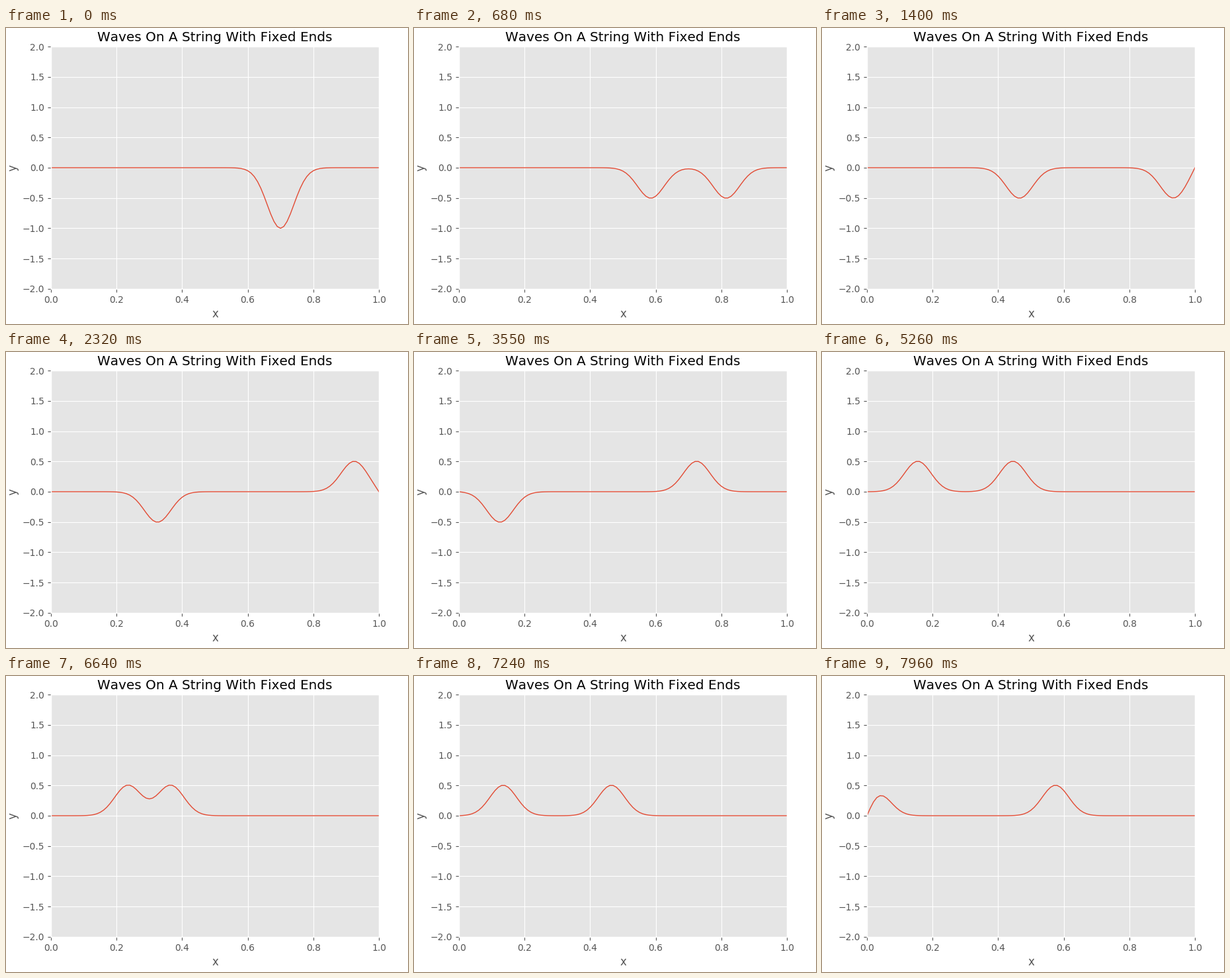
Write a matplotlib script that moves like this. It is 608 px wide and 447 px high and loops after 8000 ms.

```python
import numpy as np
import matplotlib.pyplot as plt
from matplotlib.animation import FuncAnimation

W, H, DPI = 608, 447, 100
TICK, LOOP = 20, 8000
POINTS, STEPS = 101, 132


def simulate(x):
    """Wave equation on a plucked string, fixed ends, Courant number 1."""
    y = np.zeros((STEPS, x.size))
    y[0, 1:-1] = -np.exp(-300 * (x[1:-1] - 0.7) ** 2)
    y[1] = y[0]
    for n in range(1, STEPS - 1):
        y[n + 1, 1:-1] = y[n, 2:] + y[n, :-2] - y[n - 1, 1:-1]
    return y


def step_at(ms):
    """Simulation step at a time; the pace slackens slightly late on."""
    return round(np.interp(ms, [0, 5260, LOOP], [1.2, 85.6, 128.6]))


x = np.linspace(0, 1, POINTS)
waves = simulate(x)

plt.style.use("ggplot")
plt.rcParams["font.family"] = "DejaVu Sans"
plt.rcParams["text.kerning_factor"] = 6  # whole-pixel kerning

# The tiny margin keeps the pixel size from rounding down.
fig = plt.figure(figsize=((W + 1e-6) / DPI, (H + 1e-6) / DPI), dpi=DPI,
                 facecolor="white")
ax = fig.add_axes([68 / W, 53.13 / H, 496 / W, 365.75 / H])
ax.set(xlim=(0, 1), ylim=(-2, 2), xlabel="x", ylabel="y",
       xticks=np.linspace(0, 1, 6), yticks=np.linspace(-2, 2, 9))
ax.set_title("Waves On A String With Fixed Ends")
line, = ax.plot(x, waves[0], color="#E24A33", lw=1)


def update(frame):
    line.set_ydata(waves[step_at(frame * TICK)])
    return line,


anim = FuncAnimation(fig, update, frames=LOOP // TICK, interval=TICK,
                     repeat=True, repeat_delay=0)
plt.show()
```
